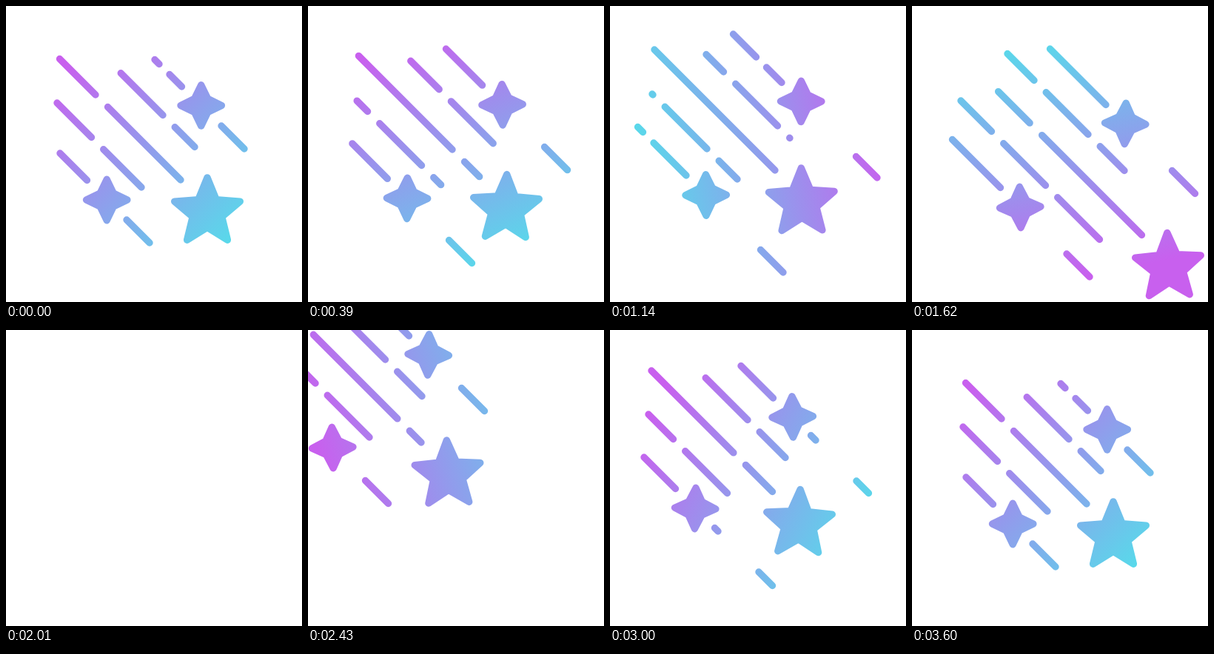
Recreate the animation shown at these times as an HTML page. Size 400x400 px, loop 5630 ms.

```html
<!DOCTYPE html>
<html lang="en">
<head>
<meta charset="utf-8">
<title>Shooting stars</title>
<style>
  html, body { margin: 0; width: 100%; height: 100%; overflow: hidden; background: #fff; }
  svg { display: block; width: 100%; height: 100%; }
</style>
</head>
<body>
<svg viewBox="0 0 400 400">
  <defs>
    <linearGradient id="sky" gradientUnits="userSpaceOnUse">
      <stop offset="0" stop-color="#c860ee"/>
      <stop offset="1" stop-color="#54deea"/>
    </linearGradient>
  </defs>
  <path id="art" fill="url(#sky)" stroke="url(#sky)" stroke-width="9.4"
        stroke-linecap="round" stroke-linejoin="round"/>
</svg>
<script>
const LOOP = 5630, END = 3600, STEP = 30;
const LAUNCH = 1140, PASS = 1620, WRAP = 2000;
const BEATS = [0, 750, LAUNCH, PASS, 2430, 3000, END];
const HALF = 170;
const sky = document.getElementById('sky');
const art = document.getElementById('art');

// Monotone cubic through the given points, flat at both ends
function curve(times, values) {
  const n = times.length;
  const secant = i => (values[i + 1] - values[i]) / (times[i + 1] - times[i]);
  const slope = times.map((_, i) => {
    if (i === 0 || i === n - 1) return 0;
    const a = secant(i - 1), b = secant(i);
    return a * b > 0 ? 2 * a * b / (a + b) : 0;
  });
  return t => {
    if (t <= times[0]) return values[0];
    if (t >= times[n - 1]) return values[n - 1];
    let i = 0;
    while (t >= times[i + 1]) i++;
    const h = times[i + 1] - times[i], s = (t - times[i]) / h;
    const s2 = s * s, s3 = s2 * s;
    return values[i] * (2 * s3 - 3 * s2 + 1) + values[i + 1] * (3 * s2 - 2 * s3)
      + h * (slope[i] * (s3 - 2 * s2 + s) + slope[i + 1] * (s3 - s2));
  };
}
const beats = (...values) => curve(BEATS, values);

// Diagonal offset: draw back, shoot out lower right, glide in from upper left
function flight(mid, back, pass, enter, settle) {
  const windUp = curve([0, 750, LAUNCH], [0, mid, back]);
  const power = Math.log((350 - back) / (pass - back)) / Math.log((WRAP - LAUNCH) / (PASS - LAUNCH));
  const arrive = curve([WRAP - 10, 2150, 2430, 3000, END], [-450, -210, enter, settle, 0]);
  return t => {
    if (t < LAUNCH) return windUp(t);
    if (t < WRAP) return back + (pass - back) * ((t - LAUNCH) / (PASS - LAUNCH)) ** power;
    return arrive(t);
  };
}

const fly = {
  big: flight(-10, -13, 74.5, -83, -16.5),
  right: flight(-3, -5.5, 24.5, -101, -17),
  left: flight(-5, -6.5, 10, -103, -21),
  upper: flight(-8, -12, 32, -101, -18),
  lower: flight(-8, -11, 71, -99, -22)
};

const angle = beats(45, 103, 168, 258, 344, 388, 405);
const flow = beats(0, 78, 133, 208, 275.5, 317, 344);
const quick = beats(0, 106.5, 172.5, 286, 358.5, 430, 438);
const fast = t => flow(t) * 2.64;
const still = x => () => x;

const tilt = {
  big: beats(0, 2.4, -0.8, -2, -2, 2, 0),
  right: beats(0, -2, 0.3, 2, 2, -1.6, 0),
  left: beats(0, 1.2, -0.5, -1.8, -2, 1.7, 0)
};

const stars = [
  { x: 272, y: 278.5, tips: 5, outer: 46.6, inner: 20.8, move: fly.big, turn: tilt.big },
  { x: 263.7, y: 134.4, tips: 4, outer: 27.7, inner: 12.8, move: fly.right, turn: tilt.right },
  { x: 136.2, y: 262, tips: 4, outer: 27.7, inner: 12.8, move: fly.left, turn: tilt.left }
];

// Each track lies on y = x - skew; its gaps repeat and slide along by run(t)
const tracks = [
  { skew: 128.5, move: fly.right, from: beats(201, 174, 172, 162, 174, 191, 201), to: 237.5,
    gaps: [207, 70], size: 14, period: 344, run: flow },
  { skew: 129, move: fly.right, from: still(288.5), to: 366.5,
    gaps: [322], size: 55, period: 86, run: flow },
  { skew: 64.5, move: fly.upper, from: beats(142, 142, 142, 97, 142, 142, 142), to: 255,
    gaps: [212], size: 16.2, period: 73, run: quick },
  { skew: 1, move: fly.big, from: beats(72.5, 73, 73, 40, 73, 72.5, 72.5), to: 236,
    gaps: [121, -66, -298, -464.5, -523.5, -653.5], size: 16.5, period: 344 * 2.64, run: fast },
  { skew: -62, move: fly.lower, from: beats(69, 70, 68, -5, 69, 74, 69), to: 183,
    gaps: [115.5], size: 16.2, period: 73, run: quick },
  { skew: -126, move: fly.left, from: beats(73, 49, 44, 39, 50, 67, 73), to: 109.5,
    gaps: [-82, -178], size: 14.5, period: 344, run: flow },
  { skew: -126, move: fly.left, from: still(162.5), to: 240.5,
    gaps: [194], size: 55, period: 86, run: flow }
];

const pt = (x, y) => x.toFixed(2) + ' ' + y.toFixed(2);

function starPath(s, t) {
  const d = s.move(t), turn = s.turn(t) * Math.PI / 180;
  const points = [];
  for (let i = 0; i < s.tips * 2; i++) {
    const r = i % 2 ? s.inner : s.outer;
    const a = turn + i * Math.PI / s.tips;
    points.push(pt(s.x + d + r * Math.sin(a), s.y + d - r * Math.cos(a)));
  }
  return 'M' + points.join('L') + 'Z';
}

function trackPath(k, t) {
  const d = k.move(t), lo = k.from(t), hi = k.to, shift = k.run(t);
  const cuts = [];
  for (const g of k.gaps) {
    let x = g + shift;
    x -= Math.ceil((x + k.size - lo) / k.period) * k.period;
    for (; x < hi; x += k.period) cuts.push(x);
  }
  cuts.sort((a, b) => a - b).push(hi);
  let path = '', start = lo;
  for (const cut of cuts) {
    const end = Math.min(cut, hi);
    if (end - start > 0.2) {
      path += 'M' + pt(start + d, start + d - k.skew) + 'L' + pt(end + d, end + d - k.skew);
    }
    start = Math.max(start, cut + k.size);
  }
  return path;
}

function draw(t) {
  const a = angle(t) * Math.PI / 180;
  const dx = HALF * Math.cos(a), dy = HALF * Math.sin(a);
  const ends = { x1: 200 - dx, y1: 200 - dy, x2: 200 + dx, y2: 200 + dy };
  for (const name in ends) sky.setAttribute(name, ends[name].toFixed(2));
  art.setAttribute('d', stars.map(s => starPath(s, t)).join('') + tracks.map(k => trackPath(k, t)).join(''));
}

const origin = performance.now();
function tick() {
  const t = (performance.now() - origin) % LOOP;
  draw(Math.min(END, Math.floor(t / STEP) * STEP));
  requestAnimationFrame(tick);
}
tick();
</script>
</body>
</html>
```
